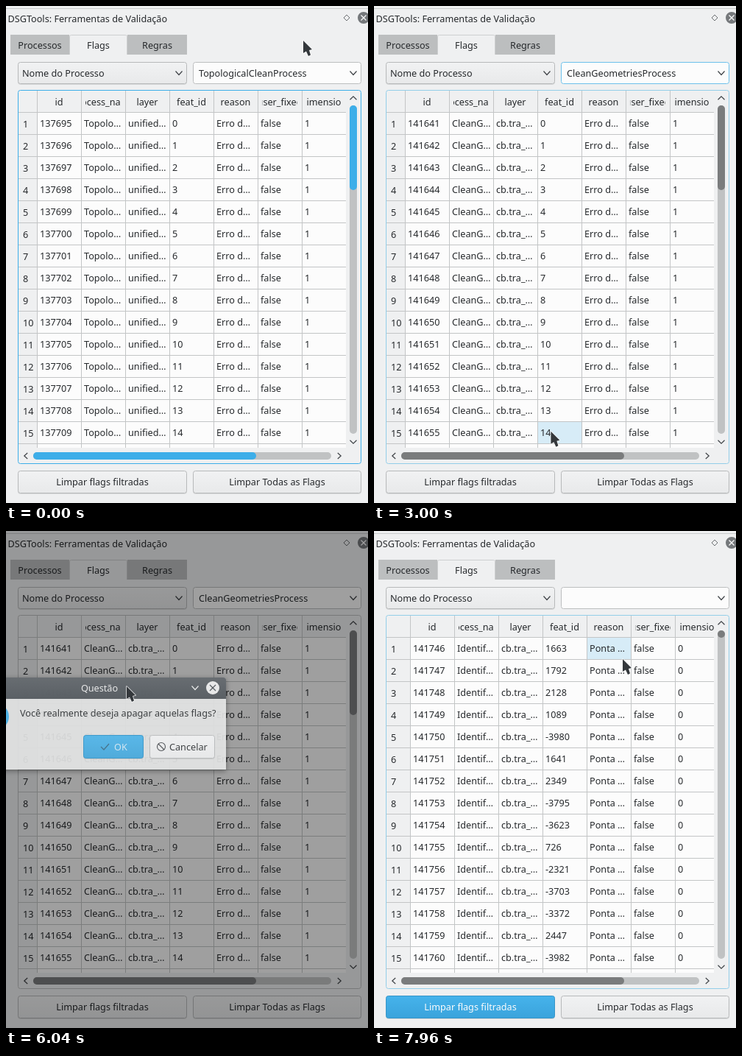
An HTML page with a canvas for the animation above (8000 ms loop, 492 px wide and 675 px high).

```html
<!DOCTYPE html>
<html lang="pt">
<head>
<meta charset="utf-8">
<title>Ferramentas de Validação</title>
<style>
  html, body { margin: 0; width: 100%; height: 100%; overflow: hidden; background: #eff0f1; }
  canvas { display: block; width: 492px; height: 675px; }
</style>
</head>
<body>
<canvas id="stage"></canvas>
<script>
const W = 492, H = 675, LOOP = 8000, STEP = 40;
const canvas = document.getElementById('stage');
const ctx = canvas.getContext('2d');
const ratio = window.devicePixelRatio || 1;
canvas.width = W * ratio;
canvas.height = H * ratio;

const BG = '#eff0f1', BASE = '#fcfcfc', INK = '#26292c', LINE = '#bcbebf';
const BLUE = '#3daee9', HOVER = '#93cee9', GRID = '#c3c5c6';
const FONT = '12.67px "Noto Sans", sans-serif';

const clamp = (v, a = 0, b = 1) => Math.min(b, Math.max(a, v));
const ramp = (t, a, b) => clamp((t - a) / (b - a));
const pulse = (t, a, b, c, d) => ramp(t, a, b) - ramp(t, c, d);
const smooth = k => k * k * (3 - 2 * k);

function mix(a, b, k) {
  const part = (s, i) => parseInt(s.slice(i, i + 2), 16);
  return '#' + [1, 3, 5].map(i =>
    Math.round(part(a, i) + (part(b, i) - part(a, i)) * k).toString(16).padStart(2, '0')).join('');
}

// Pointer path: time, x, y
const PATH = [
  [280, 404, 47], [920, 440, 90], [1400, 440, 90], [2040, 418, 170], [2400, 418, 170],
  [3140, 222, 620], [3520, 200, 655], [4040, 200, 655], [4360, -20, 430], [5720, -100, 211],
  [6040, 164, 211], [6160, 164, 211], [6520, 157, 292], [6960, 157, 292], [7360, 170, 229],
  [7400, 170, 229], [7760, 338, 176], [7920, 338, 176], [7960, 338, 174]
];

function pointerAt(t) {
  if (t <= PATH[0][0]) return PATH[0].slice(1);
  for (let i = 1; i < PATH.length; i++) {
    const [t0, x0, y0] = PATH[i - 1], [t1, x1, y1] = PATH[i];
    if (t <= t1) {
      const k = smooth(ramp(t, t0, t1));
      return [x0 + (x1 - x0) * k, y0 + (y1 - y0) * k];
    }
  }
  return PATH[PATH.length - 1].slice(1);
}

const COLUMNS = ['id', 'process_name', 'layer', 'feat_id', 'reason', 'user_fixed', 'dimension'];
const DANGLES = [1663, 1792, 2128, 1089, -3980, 1641, 2349, -3795, -3623, 726, -2321, -3703, -3372, 2447, -3982];
const DATA = [
  i => [137695 + i, 'Topolo…', 'unified…', i, 'Erro d…', 'false', 1],
  i => [141641 + i, 'CleanG…', 'cb.tra_…', i, 'Erro d…', 'false', 1],
  i => [141746 + i, 'Identif…', 'cb.tra_…', DANGLES[i], 'Ponta …', 'false', 0]
];
const PROCESSES = ['', 'IdentifyDanglesProcess', 'CleanGeometriesProcess', 'TopologicalCleanProcess'];

function fill(x, y, w, h, color) {
  ctx.fillStyle = color;
  ctx.fillRect(x, y, w, h);
}

function round(x, y, w, h, r, color, stroke) {
  ctx.beginPath();
  ctx.roundRect(x, y, w, h, r);
  if (color) { ctx.fillStyle = color; ctx.fill(); }
  if (stroke) { ctx.strokeStyle = stroke; ctx.lineWidth = 1; ctx.stroke(); }
}

function text(s, x, y, color = INK, align = 'left') {
  ctx.fillStyle = color;
  ctx.textAlign = align;
  ctx.fillText(s, x, y);
}

function stroke(points, color, width = 1, close = false) {
  ctx.beginPath();
  points.forEach(([x, y]) => ctx.lineTo(x, y));
  if (close) ctx.closePath();
  ctx.strokeStyle = color;
  ctx.lineWidth = width;
  ctx.stroke();
}

function chevron(x, y, dx, dy, color = '#3f4347') {
  const tip = [x + dx, y + dy];
  const ends = dx ? [[x - dx, y - 4], [x - dx, y + 4]] : [[x - 4.5, y - dy], [x + 4.5, y - dy]];
  stroke([ends[0], tip, ends[1]], color, 1.2);
}

function cross(x, y, r, color) {
  stroke([[x - r, y - r], [x + r, y + r]], color, 1.2);
  stroke([[x + r, y - r], [x - r, y + r]], color, 1.2);
}

function disc(x, y, r, color) {
  ctx.beginPath();
  ctx.arc(x, y, r, 0, 7);
  ctx.fillStyle = color;
  ctx.fill();
}

function clip(x, y, w, h, draw) {
  ctx.save();
  ctx.beginPath();
  ctx.rect(x, y, w, h);
  ctx.clip();
  draw();
  ctx.restore();
}

function panel(x, y, w, h, top, bottom, border) {
  const g = ctx.createLinearGradient(0, y, 0, y + h);
  g.addColorStop(0, top);
  g.addColorStop(1, bottom);
  round(x + .5, y + 1.5, w - 1, h - 1, 3, null, 'rgba(0,0,0,.1)');
  round(x + .5, y + .5, w - 1, h - 1, 3, g, border);
}

const button = (x, y, w, h, border = '#b7b9ba') => panel(x, y, w, h, '#f1f2f3', '#e8e9ea', border);

function drawTop(s) {
  fill(0, 0, W, H, BG);
  fill(0, 3, W, 1, '#c9cbcc');
  text('DSGTools: Ferramentas de Validação', 2.5, 22);
  stroke([[463, 12], [467, 16], [463, 20], [459, 16]], '#6b6f72', 1, true);
  disc(486, 16, 8, '#75787b');
  cross(486, 16, 3.5, BASE);

  fill(6, 39, 80, 27, '#bcbebf');
  fill(165, 39, 81, 27, '#bcbebf');
  round(86.5, 39.5, 78, 30, [2, 2, 0, 0], BG, '#cdcfd0');
  fill(86, 66, 80, 5, BG);
  text('Processos', 46, 58, INK, 'center');
  text('Flags', 125.5, 58, INK, 'center');
  text('Regras', 205.5, 58, INK, 'center');

  button(16, 76, 230, 30);
  text('Nome do Processo', 22, 96);
  chevron(235, 91, 0, 2.5);
  round(254.5, 76.5, 228, 29, 3, BASE, mix(LINE, '#6cc0eb', s.comboFocus));
  text(s.choice, 262, 96);
  chevron(472, 91, 0, 2.5, mix('#3f4347', BLUE, s.arrow));
  if (s.caret) fill(410, 82, 1, 18, INK);
}

function drawTable(s) {
  const left = s.wide ? 49 : 42;
  const colX = c => left + c * 60;
  const row = DATA[s.data];

  round(16.5, 114.5, 466, 507, 3, BG, s.border);
  clip(17, 115, 445, 485, () => {
    fill(left, 145, 462 - left, 455, BASE);
    if (s.hover) {
      const [c, r] = [Math.floor((s.px - left) / 60), Math.floor((s.py - 145) / 30)];
      if (c >= 0 && r >= 0 && r < 15 && s.px < 462) fill(colX(c) + 1, 145 + r * 30, 59, 29, '#d7ecf7');
    }
    COLUMNS.forEach((name, c) => {
      fill(colX(c), 115, 1, 485, GRID);
      clip(colX(c) + 6, 115, 48, 30, () => text(name, colX(c) + 30, 135, INK, 'center'));
    });
    for (let i = 0; i <= 15; i++) fill(17, 144 + i * 30, 445, 1, GRID);
    for (let i = 0; i < 15; i++) {
      const y = 164 + i * 30;
      text(i + 1, 23, y + 1);
      row(i).forEach((v, c) => text(v, colX(c) + 4, y));
    }
  });

  const thumb = mix('#7a7c7d', BLUE, s.tableFocus);
  round(467, 135, 10, 446, 5, '#c0c2c3');
  round(467, 135, 10, s.wide ? 10 : 115, 5, thumb);
  round(37, 606, 405, 10, 5, '#c0c2c3');
  round(37, 606, 303, 10, 5, thumb);
  chevron(472, 125, 0, -2.2);
  chevron(472, 592, 0, 2.2);
  chevron(27, 611, -2.2, 0);
  chevron(453, 611, 2.2, 0);
}

function drawButtons(s) {
  const shade = (base, press, focus) => mix(mix(base, press, s.press), focus, s.buttonFocus);
  panel(16, 631, 230, 31, shade('#f1f2f3', '#95d0ee', '#46b3ec'),
    shade('#e8e9ea', '#7eb8d6', '#3aa3db'), shade(s.overButton ? HOVER : '#b7b9ba', '#78aecb', '#3595c8'));
  text('Limpar flags filtradas', 131, 651, mix(INK, BASE, s.buttonFocus), 'center');
  button(254, 631, 229, 31);
  text('Limpar Todas as Flags', 368.5, 651, INK, 'center');
}

function withShadow(blur, draw) {
  ctx.save();
  ctx.shadowColor = 'rgba(0,0,0,.45)';
  ctx.shadowBlur = blur * ratio;
  ctx.shadowOffsetY = 2 * ratio;
  draw();
  ctx.restore();
}

function drawPopup(alpha, chosen) {
  ctx.globalAlpha = alpha;
  withShadow(4, () => fill(254, 107, 229, 98, BASE));
  PROCESSES.forEach((name, i) => {
    const y = 108 + i * 24;
    if (i === chosen) fill(255, y, 227, 24, BLUE);
    text(name, 258, y + 16.5, i === chosen ? BASE : INK);
  });
  ctx.globalAlpha = 1;
}

function drawDialog(dx, alpha) {
  ctx.save();
  ctx.translate(dx, 0);
  ctx.globalAlpha = alpha;
  withShadow(7, () => round(-45, 199, 344, 125, [3, 3, 0, 0], BG));
  const g = ctx.createLinearGradient(0, 199, 0, 228);
  g.addColorStop(0, '#565c61');
  g.addColorStop(1, '#474d53');
  round(-45, 199, 344, 29, [3, 3, 0, 0], g);
  text('Questão', 127, 218, BASE, 'center');
  chevron(257, 213, 0, 2.5, BASE);
  disc(281, 213, 9, BASE);
  cross(281, 213, 4, '#474d53');

  disc(-14, 252, 18, BLUE);
  text('?', -14, 257, BASE, 'center');
  text('Você realmente deseja apagar aquelas flags?', 19, 252);
  panel(105, 277, 82, 32, '#46b2ea', '#3ba3da', '#3796c8');
  stroke([[129, 293], [133, 297], [140, 289]], '#456b80', 1.2);
  text('OK', 147, 298, '#e6eef3');
  button(195, 277, 89, 32);
  ctx.beginPath();
  ctx.arc(211, 293, 5.5, 0, 7);
  ctx.strokeStyle = '#3f4347';
  ctx.lineWidth = 1.1;
  ctx.stroke();
  stroke([[207, 289], [215, 297]], '#3f4347', 1.1);
  text('Cancelar', 222, 298);
  ctx.restore();
}

function drawPointer(x, y) {
  ctx.beginPath();
  [[0, 0], [0, 17], [4, 14.5], [7, 21], [10, 19.5], [8, 13], [12, 12]]
    .forEach(([dx, dy]) => ctx.lineTo(x + dx, y + dy));
  ctx.closePath();
  ctx.lineJoin = 'round';
  ctx.strokeStyle = 'rgba(255,255,255,.85)';
  ctx.lineWidth = 1.6;
  ctx.stroke();
  ctx.fillStyle = '#34383c';
  ctx.fill();
  ctx.lineJoin = 'miter';
}

function draw(t) {
  const [px, py] = pointerAt(t);
  const popup = pulse(t, 1080, 1240, 2320, 2520);
  const tableFocus = 1 - ramp(t, 1000, 1240);
  const free = (t > 2520 && t < 4040) || t > 7000;
  const overTable = free && px > 16 && px < 483 && py > 114 && py < 622;
  const tableHover = t < 4040 ? pulse(t, 2520, 2640, 3140, 3280) : ramp(t, 7000, 7160);
  const s = {
    px, py, tableFocus,
    hover: overTable && py > 145 && py < 600,
    border: mix(mix(LINE, HOVER, tableHover), BLUE, tableFocus),
    comboFocus: pulse(t, 760, 960, 3960, 4160),
    arrow: pulse(t, 800, 960, 2480, 2680),
    caret: (t >= 2320 && t < 2820) || (t >= 3320 && t < 3500),
    choice: t < 2320 ? PROCESSES[3] : t < 6720 ? PROCESSES[2] : '',
    data: t < 2360 ? 0 : t < 6720 ? 1 : 2,
    wide: t >= 7080,
    press: pulse(t, 3840, 3960, 4080, 4240),
    buttonFocus: ramp(t, 7080, 7280),
    overButton: t > 3200 && t < 4200 && py > 631 && px > 16
  };
  const dim = .37 * (smooth(ramp(t, 4160, 4560)) - ramp(t, 6640, 7120));

  ctx.setTransform(ratio, 0, 0, ratio, 0, 0);
  ctx.font = FONT;
  ctx.textBaseline = 'alphabetic';
  drawTop(s);
  drawTable(s);
  drawButtons(s);
  if (popup > 0) drawPopup(popup, py < 108 ? 3 : clamp(Math.floor((py - 108) / 24), 0, 3));
  if (dim > 0) fill(0, 0, W, H, `rgba(0,0,0,${dim})`);
  if (t >= 5760 && t < 6800) {
    const solid = .87 + .13 * ramp(t, 6080, 6240);
    drawDialog(Math.min(0, px - 164) * (t < 6100), solid * (1 - ramp(t, 6560, 6760)));
  }
  if (px > -15) drawPointer(px, py);
}

const start = performance.now();
function loop() {
  const t = (performance.now() - start) % LOOP;
  draw(Math.floor(t / STEP) * STEP);
  requestAnimationFrame(loop);
}
loop();
</script>
</body>
</html>
```
